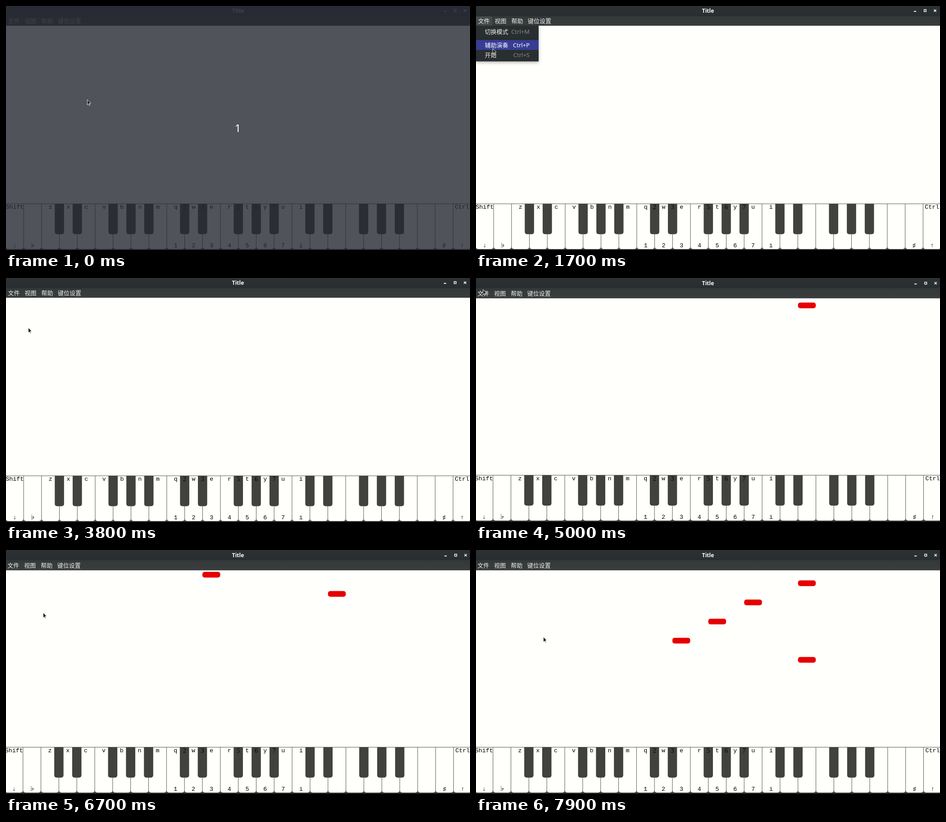
These frames come from a looping animation (1030 by 544 pixels, 8 s). An HTML page with a canvas:

```html
<!DOCTYPE html>
<html lang="zh">
<head>
<meta charset="utf-8">
<title>Piano</title>
<style>
  html, body { margin: 0; width: 1030px; height: 544px; overflow: hidden; }
  canvas { display: block; }
</style>
</head>
<body>
<canvas id="stage" width="1030" height="544"></canvas>
<script>
const ctx = document.getElementById('stage').getContext('2d');
const LOOP = 8000, STEP = 100;
const UI = '13px "Noto Sans", "Noto Sans CJK SC", "Noto Sans CJK", sans-serif';
const MONO = '13.33px "Liberation Mono", monospace';
const PAPER = '#fffffc';

// The window is laid out slightly differently before and after the first start.
const BEFORE = { keyX: -0.6, keyW: 39.72, keyTop: 440.5, keyEnd: 542, head: 0, menuX: 0, menuY: 0, iconX: 0 };
const AFTER = { keyX: -2.1, keyW: 39.825, keyTop: 439.2, keyEnd: 541, head: 1.3, menuX: -1, menuY: 2, iconX: 1.3 };

const topLabels = ['Shift', '', ...'zxcvbnmqwertyui'];
topLabels[25] = 'Ctrl';
const bottomLabels = { 0: '↓', 1: '♭', 16: 'i', 24: '♯', 25: '↑' };
for (let n = 1; n < 8; n++) bottomLabels[n + 8] = n;
const blackLabels = { 10: 2, 11: 3, 13: 5, 14: 6, 15: 7 };
const noteKeys = [18, 11, 13, 15, 18];

// time, x, y of the pointer tip
const pointerPath = [
  [0, 180, 208], [500, 180, 208], [900, 16, 30], [1300, 16, 30], [1800, 42, 110],
  [1900, 42, 110], [2200, 45, 82], [3000, 45, 82], [3100, 48, 108], [3400, 49, 110],
  [3800, 49, 110], [4200, 25, 50], [4300, 25, 50], [4500, 13, 23], [4900, 13, 23],
  [5000, 15, 25], [5100, 14, 30], [5300, 14, 30], [5900, 48.5, 112], [6500, 48.5, 112],
  [7100, 149, 193], [LOOP, 149, 193]
];

function pointerAt(t) {
  const i = pointerPath.findIndex(p => p[0] > t);
  const [t0, x0, y0] = pointerPath[i - 1], [t1, x1, y1] = pointerPath[i];
  const k = (t - t0) / (t1 - t0);
  return [x0 + (x1 - x0) * k, y0 + (y1 - y0) * k];
}

function rect(x, y, w, h, color) {
  ctx.fillStyle = color;
  ctx.fillRect(x, y, w, h);
}

function round(x, y, w, h, radii, color) {
  ctx.fillStyle = color;
  ctx.beginPath();
  ctx.roundRect(x, y, w, h, radii);
  ctx.fill();
}

function text(str, x, y, color, font = UI, align = 'left') {
  ctx.font = font;
  ctx.fillStyle = color;
  ctx.textAlign = align;
  ctx.fillText(str, x, y);
}

function gradient(y0, y1, from, to) {
  const g = ctx.createLinearGradient(0, y0, 0, y1);
  g.addColorStop(0, from);
  g.addColorStop(1, to);
  return g;
}

function drawHeader(L, active, menuOpen) {
  const y = L.head, ink = active ? '#fff' : '#a0a4a5';
  rect(0, 0, 1030, 22 + y, active ? gradient(0, 22, '#2c3234', '#292e30') : '#33393c');
  rect(0, 22 + y, 1030, 22, active ? gradient(22, 44, '#333839', '#393d3e') : '#363b3d');
  rect(0, 22 + y, 1030, 1, '#2a2e30');
  text('Title', 515, 14.5 + y, ink, 'bold 12px "Noto Sans", sans-serif', 'center');

  const x = L.iconX;
  rect(972 + x, 11 + y, 5, 2, ink);
  ctx.strokeStyle = ink;
  ctx.lineWidth = 1.5;
  ctx.strokeRect(994.7 + x, 8 + y, 4.5, 4.5);
  ctx.beginPath();
  for (const s of [-1, 1]) {
    ctx.moveTo(1019 + x - 2.6, 10.3 + y - 2.6 * s);
    ctx.lineTo(1019 + x + 2.6, 10.3 + y + 2.6 * s);
  }
  ctx.stroke();

  if (menuOpen) rect(0, 23 + y, 36 + L.menuX, 21, '#464a4b');
  const menuInk = active ? '#f0f0ee' : '#a3a6a6';
  [['文件', 4.5], ['视图', 41.5], ['帮助', 78.5], ['键位设置', 115]]
    .forEach(([label, left]) => text(label, left + L.menuX * 1.3, 37.8 + y, menuInk));
}

function drawMenu(L, hover) {
  const x = L.menuX, y = L.menuY;
  ctx.save();
  ctx.shadowColor = 'rgba(0,0,0,.3)';
  ctx.shadowBlur = 7;
  ctx.shadowOffsetY = 2;
  rect(0, 44 + L.head, 139 + x, 79.5 + y - L.head, '#292e30');
  ctx.restore();
  rect(0, 71.5 + y, 139 + x, 1, '#222628');
  [['切换模式', 'M', 57], ['辅助演奏', 'P', 87], ['开始', 'S', 109]].forEach(([label, key, mid], i) => {
    const on = i === hover;
    if (on) rect(0, mid - 11 + y, 139 + x, 22, '#373d94');
    text(label, 19.5 + x, mid + 4.8 + y, on ? '#fff' : '#f0f0ee');
    text('Ctrl+' + key, 119 + x, mid + 4.6 + y, on ? '#fff' : '#858889', UI, 'right');
  });
}

function drawNotes(L, steps) {
  ctx.save();
  ctx.beginPath();
  ctx.rect(0, 45, 1030, 394);
  ctx.clip();
  noteKeys.forEach((key, i) =>
    round(L.keyX + key * L.keyW, 54.7 + 12.25 * steps - 42.65 * i, 39.5, 12.7, 5, '#e60000'));
  ctx.restore();
}

function drawKeys(L) {
  const edge = k => L.keyX + k * L.keyW;
  rect(0, L.keyTop, 1030, 544 - L.keyTop, '#53544f');
  for (let k = 0; k < 26; k++) {
    const mid = edge(k + 0.5);
    round(edge(k) + 0.5, L.keyTop + 1, L.keyW - 1, L.keyEnd - L.keyTop - 1, [0, 0, 5, 5], PAPER);
    text(topLabels[k] ?? '', mid, L.keyTop + 11.3, '#000', MONO, 'center');
    text(bottomLabels[k] ?? '', mid, L.keyTop + 97.6, '#000', MONO, 'center');
  }
  rect(0, L.keyEnd, 1030, 3, '#25282b');
  for (let k = 3; k < 23; k++) {
    if (k % 7 === 2 || k % 7 === 5) continue;
    round(edge(k) - 10.3, L.keyTop + 0.5, 20.6, 67.8, [0, 0, 5, 5], '#41413d');
    text(blackLabels[k] ?? '', edge(k), L.keyTop + 12.7, '#000',
      '14px "Liberation Serif", serif', 'center');
  }
}

function drawPointer(x, y) {
  ctx.beginPath();
  [[0, 0], [0, 11.5], [2.5, 9], [4.4, 13], [6, 12.2], [4.2, 8.3], [7.8, 8.1]]
    .forEach(([dx, dy]) => ctx.lineTo(x + 0.5 + dx, y + 0.8 + dy));
  ctx.closePath();
  ctx.fillStyle = '#161616';
  ctx.fill();
  ctx.strokeStyle = '#fff';
  ctx.lineWidth = 0.9;
  ctx.stroke();
}

function draw(t) {
  const L = t < 3900 ? BEFORE : AFTER;
  const menuOpen = (t >= 1300 && t < 3800) || (t >= 5300 && t < 6500);
  const steps = t < 4200 ? (t - 4200) / STEP : Math.max(0, (t - 6400) / STEP);
  const [px, py] = pointerAt(t);

  rect(0, 0, 1030, 544, PAPER);
  drawHeader(L, t >= 1300, menuOpen);
  drawNotes(L, steps);
  drawKeys(L);
  if (menuOpen) {
    const row = py - L.menuY;
    drawMenu(L, row >= 98 ? 2 : row >= 76 ? 1 : row >= 46 && row < 68 ? 0 : -1);
  }
  if (t < 500) {
    rect(0, 0, 1030, 544, 'rgba(38,41,51,.8)');
    text('1', 514.5, 281, '#fff', '24px "Noto Sans", sans-serif', 'center');
  }
  drawPointer(px, py);
}

const start = performance.now();
function tick() {
  const t = (performance.now() - start) % LOOP;
  draw(Math.floor(t / STEP) * STEP);
  requestAnimationFrame(tick);
}
tick();
</script>
</body>
</html>
```
